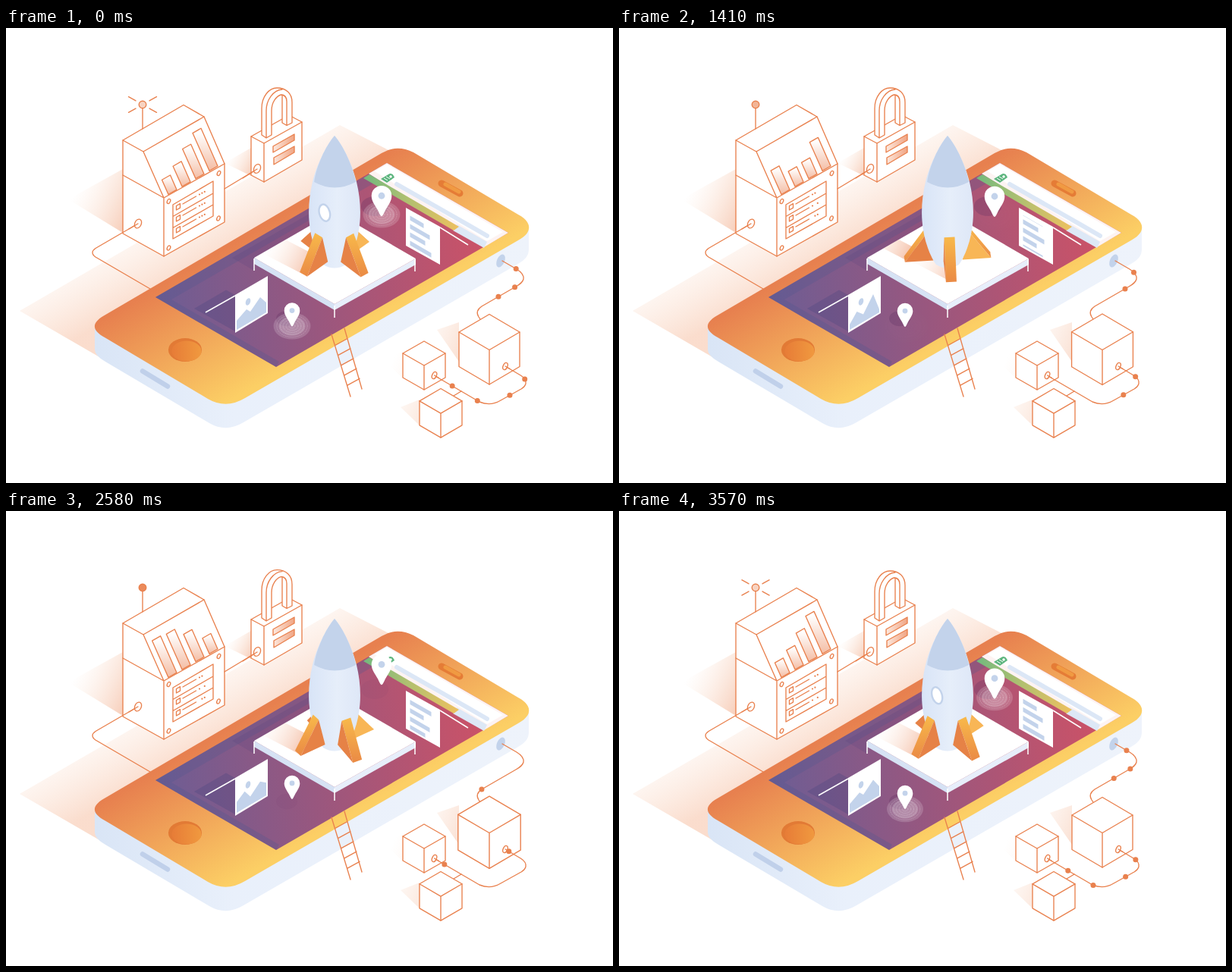
Recreate the animation shown at these times as an HTML page. Size 800x600 px, loop 3600 ms.

```html
<!DOCTYPE html>
<html lang="en">
<head>
<meta charset="utf-8">
<title>Launch</title>
<style>
html, body { margin: 0; width: 100%; height: 100%; overflow: hidden; background: #fff; }
svg { display: block; width: 800px; height: 600px; }
.line { fill: none; stroke: #e9814e; stroke-width: 1.35; stroke-linejoin: round; stroke-linecap: round; }
.box { fill: #fff; }
.dot { fill: #e9814e; }
.blue { fill: #c3d3eb; }
.white { fill: none; stroke: #fff; stroke-width: 1.5; }
</style>
</head>
<body>
<svg viewBox="0 0 800 600">
  <defs>
    <linearGradient id="top" gradientUnits="userSpaceOnUse" x1="198" y1="343" x2="287" y2="497"><stop stop-color="#e7804f"/><stop offset="1" stop-color="#fccf65"/></linearGradient>
    <linearGradient id="side"><stop stop-color="#d9e5f6"/><stop offset=".32" stop-color="#e9f0fb"/><stop offset="1" stop-color="#eef3fb"/></linearGradient>
    <linearGradient id="screen" gradientUnits="userSpaceOnUse" x1="200" y1="355" x2="630" y2="280"><stop stop-color="#6d5d94"/><stop offset=".45" stop-color="#98577f"/><stop offset="1" stop-color="#cb5267"/></linearGradient>
    <linearGradient id="load"><stop stop-color="#72b97e"/><stop offset=".5" stop-color="#b5c06f"/><stop offset="1" stop-color="#eec05f"/></linearGradient>
    <linearGradient id="phoneShade" gradientUnits="userSpaceOnUse" x1="300" y1="290" x2="240" y2="186"><stop stop-color="#f3a57c" stop-opacity=".38"/><stop offset="1" stop-color="#f9d3ba" stop-opacity="0"/></linearGradient>
    <linearGradient id="shade" x1="1" y1=".9" x2=".1" y2=".4"><stop stop-color="#f0a27c" stop-opacity=".5"/><stop offset="1" stop-color="#f9d3ba" stop-opacity="0"/></linearGradient>
    <linearGradient id="finShade" gradientUnits="userSpaceOnUse" x1="0" y1="0" x2="-52" y2="-28"><stop stop-color="#f0a583" stop-opacity=".6"/><stop offset="1" stop-color="#fbe0d0" stop-opacity="0"/></linearGradient>
    <linearGradient id="bar" x2="0" y2="1"><stop offset=".1" stop-color="#fff"/><stop offset="1" stop-color="#f4bda4"/></linearGradient>
    <linearGradient id="slot"><stop stop-color="#fde9df"/><stop offset="1" stop-color="#f0a584"/></linearGradient>
    <linearGradient id="body"><stop stop-color="#d8e4f7"/><stop offset=".55" stop-color="#e6eefa"/><stop offset="1" stop-color="#dee7f7"/></linearGradient>
    <linearGradient id="edge" x2="0" y2="1"><stop stop-color="#f8b94a"/><stop offset="1" stop-color="#ea8a45"/></linearGradient>
    <linearGradient id="home"><stop stop-color="#e77c37"/><stop offset="1" stop-color="#f0993f"/></linearGradient>
    <clipPath id="deck"><path d="M327 303L433 242 540 304 433 364Z"/></clipPath>
    <clipPath id="page"><path d="M532 246.500L568 267.300V307.800L532 287Z"/></clipPath>
  </defs>

  <path fill="url(#phoneShade)" d="M18 373L125 435 118 390 508 163 440 128Z"/>
  <path fill="url(#shade)" d="M82 226L154 270V186Z"/>
  <path fill="url(#shade)" d="M288 178L323 195V158Z"/>
  <path fill="url(#shade)" d="M498 438L523 462V426ZM520 500L545 524V490ZM568 398L597 440V388Z"/>

  <!-- server -->
  <path class="line box" d="M154 148L234 101.500 261 117 288 179V256L208 301 154 271Z"/>
  <path class="line" d="M154 148L181 163 261 117M181 163L208 224 288 179M208 224V301M154 194L208 224M180 106V133"/>
  <g id="bars"></g>
  <path class="line" d="M220 233L273 202V248L220 278ZM220 248.500L273 218M220 263.500L273 233"/>
  <g id="rows"></g>
  <circle class="box" cx="180" cy="101" r="4.800"/>
  <circle class="line" id="ball" cx="180" cy="101" r="4.800" style="fill:#e9814e"/>
  <path class="line" id="rays"/>
  <path class="line" d="M174 258L118 290.500Q110 296 118 302L190 344M288 212L331 186"/>

  <!-- padlock -->
  <path class="line box" d="M323 143L373 115 390 124V174L340 203 323 194Z"/>
  <path class="line" d="M323 143L340 152 390 124M340 152V203"/>
  <path class="line" style="fill:url(#slot)" d="M352 156L380 140V148L352 164ZM353 171L380 156V164L353 180Z"/>
  <path class="line box" id="shackle"/>
  <path class="line" d="M331 186L312 198"/>
  <g id="rings"></g>

  <!-- phone -->
  <path fill="url(#side)" d="M117 393V424Q117 432 131 440L268 521Q290 534 313 520L675 311Q689 303 689 293V263Z"/>
  <path fill="url(#top)" d="M133 377L495 165Q515 153 537 164L675 246C694 256 694 270 675 280L315 488Q290 503 266 489L130 408C112 398 112 388 133 377Z"/>
  <ellipse cx="236" cy="424.500" rx="22" ry="15.500" fill="#e27a35"/>
  <ellipse cx="238" cy="426" rx="19.500" ry="13.500" fill="url(#home)"/>
  <path d="M574 205L598 218" stroke="#e57c36" stroke-width="9" stroke-linecap="round"/>
  <path d="M579 206L597 216" stroke="#f09a42" stroke-width="5" stroke-linecap="round"/>
  <path d="M180 452.500L213 472.500" stroke="#c0d0ea" stroke-width="6.500" stroke-linecap="round"/>
  <ellipse class="blue" cx="652" cy="307" rx="5" ry="9" transform="rotate(24 652 307)"/>

  <!-- screen -->
  <path fill="url(#screen)" d="M197 355L356 447 662 270 502 178Z"/>
  <path fill="#50588c" opacity=".28" d="M197 355L472 196 486 204 218 358 360 440 356 447Z"/>
  <path fill="#503c78" opacity=".18" d="M298 303L405 242H433L327 303V320Z"/>
  <path fill="#46447f" opacity=".3" d="M248 370L290 345.500 302 352V400Z"/>
  <path fill="#fdf3f2" d="M478 192L502 178 662 270 630 289Z"/>
  <path fill="#fff" d="M486 189L502 180 655 269 634 281Z"/>
  <path fill="#dde8f6" d="M594 259L634 282 630 290 589 267Z"/>
  <path fill="url(#load)" d="M479 193L597 262 590 267 471 198Z"/>
  <path d="M515 206L594 251M594 251L634 274" stroke="#dce7f6" stroke-width="6" stroke-linecap="round"/>
  <path fill="#5cb57e" d="M494 199L504 193Q508 190 511 195L512 197 502 204Z"/>
  <path stroke="#fff" d="M498 198L503 201M501 196L506 199"/>
  <circle cx="507" cy="196" r="1.700" fill="#fff"/>

  <path class="white" d="M263 375L302 353M572 263L609 286"/>
  <path class="box" d="M302 352L345 327V376L302 402Z"/>
  <path class="blue" id="hills"/>
  <ellipse class="blue" cx="319" cy="361" rx="3" ry="5" transform="rotate(20 319 361)"/>
  <path class="box" d="M527 237L572 262V312L527 287Z"/>
  <g clip-path="url(#page)"><path class="blue" id="list"/></g>
  <g id="pins"></g>

  <!-- launch pad -->
  <path fill="#d6e2f4" d="M327 303L433 364V372L327 311Z"/>
  <path fill="#e7eefa" d="M540 304L433 364V372L540 312Z"/>
  <path class="box" d="M327 303L433 242 540 304 433 364Z"/>
  <path class="white" d="M327 304V320M433 366V382M539 305V321"/>
  <g id="finShades" clip-path="url(#deck)"></g>
  <g id="backFins"></g>
  <path fill="url(#body)" d="M433 142C445 156 457 182 462 203C469 232 469 262 459 290C456 299 451 308 448 312Q433 321 418 312C415 308 410 299 407 290C397 262 397 232 404 203C409 182 421 156 433 142Z"/>
  <path class="blue" d="M433 142C445 156 457 182 461 203Q433 218 406 203C409 182 421 156 433 142Z"/>
  <ellipse id="window" fill="#fff" stroke="#c3d3eb" stroke-width="2.400"/>
  <g id="frontFins"></g>

  <!-- ladder -->
  <path class="line" id="ladder"/>

  <!-- cables and cubes -->
  <path class="line" id="cableA" d="M654 307L673 318Q683 324 682 331Q681 336 672 341L627 367Q618 373 623 381L625 384"/>
  <path class="line" d="M600 479L590 485"/>
  <g id="cubes"></g>
  <path class="line" id="cableB" d="M658 446L679 458.500Q686 463 685 469Q684 473 679 476L652 491Q639 499 624 493L564 458"/>
  <g id="plugs"></g>
  <g id="beads"></g>
</svg>
<script>
const LOOP = 3600, STEP = 30, HALF = LOOP / 2, TAU = Math.PI * 2;
const $ = id => document.getElementById(id);
const mod = (a, n) => ((a % n) + n) % n;
const clamp = v => Math.max(0, Math.min(1, v));
const smooth = p => (1 - Math.cos(Math.PI * clamp(p))) / 2;

function add(parent, tag, attrs) {
  const el = document.createElementNS('http://www.w3.org/2000/svg', tag);
  set(el, attrs);
  return parent.appendChild(el);
}
function set(el, attrs) {
  for (const k in attrs) el.setAttribute(k, attrs[k]);
}
const poly = pts => 'M' + pts.map(p => p.map(v => v.toFixed(2)).join(' ')).join('L') + 'Z';

// Eased value from [time, value] pairs
function track(keys, t) {
  for (let i = 1; i < keys.length; i++) {
    const [t0, a] = keys[i - 1], [t1, b] = keys[i];
    if (t <= t1) return a + (b - a) * smooth((t - t0) / (t1 - t0));
  }
  return keys[keys.length - 1][1];
}

function ring(parent, cx, cy, rx, ry) {
  add(parent, 'ellipse', { class: 'line box', cx, cy, rx, ry, transform: `rotate(24 ${cx} ${cy})` });
}

// Server front
const bars = [900, 600, 360, 0].map((peak, i) => ({
  peak, x: 214 + 18 * i, y: 219.5 - 10.4 * i,
  el: add($('bars'), 'path', { class: 'line', style: 'fill:url(#bar)' })
}));
const lamps = [0, 1, 2].map(r => {
  const y = 236 + 15 * r;
  add($('rows'), 'path', {
    class: 'line',
    d: `M224.5 ${y - 1.5}l5 -2.900v5.500l-5 2.900ZM233 ${y - 4}l17.500 -10`
  });
  return [0, 1, 2].map(k => add($('rows'), 'circle', { class: 'dot', cx: 255 + 3.4 * k, cy: y - 16.5 - 1.8 * k, r: 1.1 }));
});
const LAMP_STEPS = ['777', '635', '356', '421', '356', '635'];
[[214.5, 228.5], [280.5, 191.5], [280, 251], [214.5, 290]].forEach(([x, y]) => ring($('rings'), x, y, 2, 3.2));
ring($('rings'), 174, 258, 4.2, 6.2);
ring($('rings'), 331, 185.5, 4.2, 6.2);
add($('rings'), 'path', { class: 'line', d: 'M174 258l-12 7M331 186l-10 6' });

let rungs = 'M429 404L454 486M446 396L469 476';
for (let i = 0; i < 5; i++) rungs += `M${433.5 + 4 * i} ${418.5 + 13.2 * i}l16.500 -9`;
set($('ladder'), { d: rungs });

// Cubes
function cube(cx, y, w, h, H) {
  const el = add($('cubes'), 'g', {}), m = y + 2 * h;
  add(el, 'path', { class: 'line box', d: `M${cx - w} ${y + h}L${cx} ${y}L${cx + w} ${y + h}v${H}L${cx} ${m + H}L${cx - w} ${y + h + H}Z` });
  add(el, 'path', { class: 'line', d: `M${cx - w} ${y + h}L${cx} ${m}L${cx + w} ${y + h}M${cx} ${m}v${H}` });
  return k => set(el, { transform: `translate(${cx} ${m}) scale(${k}) translate(${-cx} ${-m})` });
}
const bigCube = cube(637, 377.5, 40, 23.5, 45.5);
cube(551, 413, 28, 16, 32);
const lowCube = cube(573, 475.5, 28, 16.3, 32);
ring($('plugs'), 658, 446, 2.8, 4.8);
ring($('plugs'), 564.5, 458, 2.8, 4.8);
add($('plugs'), 'path', { class: 'line', d: 'M658 446l6 3.500M564.500 458l6 3.500' });

// Beads leave at the listed times and run at constant speed
const cables = [
  { path: $('cableA'), speed: 0.126, starts: [941, 1181, 1498, 1744, 2966, 3164, 3433] },
  { path: $('cableB'), speed: 0.14, starts: [960, 1221, 1435, 2540, 2814, 3143, 3379] }
];
for (const c of cables) {
  c.length = c.path.getTotalLength();
  c.beads = c.starts.map(() => add($('beads'), 'circle', { class: 'dot', r: 3.5 }));
}
function pulse(times, t) {
  let sum = 0;
  for (const at of times) {
    const d = Math.abs(mod(t - at + HALF, LOOP) - HALF);
    if (d < 110) sum += smooth(1 - d / 110);
  }
  return 1 + 0.03 * Math.min(1, sum);
}

// Map pins with ripples
const pins = [[495, 249, 1, 246], [377, 394, 0.775, 393]].map(([x, y, k, ry]) => {
  const g = $('pins');
  const shadow = add(g, 'ellipse', { cx: x - 9 * k, cy: y - 14 * k, rx: 18 * k, ry: 13 * k, fill: '#5a2c60' });
  const ripple = add(g, 'g', {});
  [1, 0.72].forEach(s => add(ripple, 'ellipse', { rx: 25 * s, ry: 18 * s, fill: '#fff', opacity: 0.17 }));
  [0.16, 0.32, 0.48, 0.64, 0.82].forEach(s => add(ripple, 'ellipse', {
    rx: 25 * s, ry: 18 * s, fill: 'none', stroke: '#fff', 'stroke-width': 0.8, 'stroke-dasharray': '1 1', opacity: 0.4
  }));
  const el = add(g, 'g', {});
  add(el, 'path', { class: 'box', d: 'M0 0C-1.500 0-3-4-5-8C-9-15-13.300-20-13.300-27A13.300 13.300 0 0 1 13.300-27C13.300-20 9-15 5-8C3-4 1.500 0 0 0Z' });
  add(el, 'circle', { class: 'blue', cy: -27, r: 4.4 });
  return { x, y, k, ry, shadow, ripple, el };
});

// Rocket fins
const fins = [0, 90, 180, 270].map(turn => {
  const el = add($('backFins'), 'g', {});
  return {
    turn, el,
    edge: add(el, 'path', { fill: 'url(#edge)' }),
    face: add(el, 'path', {}),
    shade: add($('finShades'), 'path', { fill: 'url(#finShade)' })
  };
});

function drawFin(fin, angle) {
  const a = mod(angle + fin.turn + 180, 360) - 180, r = a * Math.PI / 180;
  const s = Math.sin(r), c = Math.cos(r);
  const root = [433 + 29 * s, 267 + 9 * c];
  const tip = [433 + 57 * s, 302 + 33 * c];
  const heel = [433 + 19 * s, 302 + 5 * c];
  const shift = ([x, y], side) => [x + side * 7 * c, y - side * 4 * s];
  const side = a < 0 ? 1 : -1;
  set(fin.edge, { d: poly([shift(root, -1), shift(root, 1), shift(tip, 1), shift(tip, -1)]) });
  const mix = clamp((a - 60) / 35);
  set(fin.face, {
    d: poly([shift(root, side), shift(tip, side), shift(heel, side)]),
    fill: `rgb(${230 + 18 * mix},${130 + 52 * mix},${70 + 16 * mix})`
  });
  const layer = $(c > 0.25 ? 'frontFins' : 'backFins');
  if (fin.el.parentNode !== layer) layer.appendChild(fin.el);
  const dx = heel[0] - tip[0], dy = heel[1] - tip[1];
  set(fin.shade, {
    d: poly([[0, 0], [dx, dy], [dx - 56, dy - 29], [-56, -29]]),
    transform: `translate(${tip[0]} ${tip[1]})`,
    opacity: c > 0 ? clamp((30 - a) / 18) : 0
  });
}

function drawRocket(t) {
  const a = -46 + t / 10, r = a * Math.PI / 180, c = Math.cos(r);
  const x = 433.5 + 19 * Math.sin(r), y = 236 + 11 * c;
  const tilt = mod(a + 180, 360) - 180;
  set($('window'), {
    cx: x, cy: y, rx: Math.max(0, 10 * c), ry: 11.3,
    transform: `rotate(${tilt * 0.33} ${x} ${y})`, visibility: c > 0.02 ? 'visible' : 'hidden'
  });
  fins.forEach(f => drawFin(f, a));
}

function drawServer(t) {
  for (const b of bars) {
    const h = 0.565 + 0.25 * Math.cos(TAU * (t - b.peak) / HALF);
    const x = b.x - 27 * h, y = b.y - 61 * h;
    set(b.el, { d: poly([[b.x, b.y], [x, y], [x + 11, y - 6.3], [b.x + 11, b.y - 6.3]]) });
  }
  const masks = LAMP_STEPS[Math.floor(t / 300)];
  lamps.forEach((row, r) => row.forEach((el, k) => set(el, { opacity: masks[r] >> k & 1 })));
  set($('ball'), { 'fill-opacity': 0.65 - 0.3 * Math.cos(TAU * t / HALF) });

  const u = t > 900 ? t - HALF : t;
  const out = 7 + 11.5 * clamp((u + 300) / 280), inn = 9 + 9.5 * clamp(u / 330);
  let d = '';
  if (out > inn) for (const sx of [-1, 1]) for (const sy of [-1, 1])
    d += `M${180 + sx * inn} ${101 + sy * inn * 0.56}L${180 + sx * out} ${101 + sy * out * 0.56}`;
  set($('rays'), { d });
}

const LIFT = [[0, 0], [360, 0], [590, -16.5], [920, 8], [1210, -7], [1400, 0], [HALF, 0]];
function drawLock(t) {
  const v = track(LIFT, t), y = n => n + v;
  set($('shackle'), {
    d: `M337 141V${y(106)}C337 ${y(90)} 347 ${y(79)} 357 ${y(79)}C369 ${y(79)} 377 ${y(86)} 377 ${y(98)}V125L370 128.500V${y(97)}` +
       `C370 ${y(91)} 367 ${y(88)} 362.500 ${y(88)}C356 ${y(90)} 350 ${y(98)} 350 ${y(109)}V141L343 145Z` +
       `M343 145V${y(109)}C343 ${y(95)} 352 ${y(82)} 364 ${y(81)}C352 ${y(82)} 343 ${y(95)} 343 ${y(109)}Z` +
       `M364 ${y(88)}V125L370 128.500V${y(97)}Q370 ${y(90)} 364 ${y(88)}Z`
  });
}

const LENGTHS = [18, 26, 20, 28];
function drawCards(t) {
  const scroll = 44 * t / LOOP;
  let d = '';
  for (let i = 0; i < 9; i++) {
    const w = LENGTHS[i % 4];
    d += `M532.5 ${247.5 + 11 * i - scroll}l${w} ${w * 0.577}v6l${-w} ${-w * 0.577}Z`;
  }
  set($('list'), { d });
  const w = TAU * t / LOOP, s = Math.sin(w * 2), c = Math.cos(w);
  set($('hills'), {
    d: poly([[304, 398], [304, 386 - 5 * s], [315 + 2 * c, 371 - 3 * s], [322, 376 - 2 * c],
      [335, 355 + 4 * s], [343, 362 - 9 * s], [343, 375]])
  });
}

function drawPins(t) {
  const u = t < 45 ? t + LOOP : t;
  const hop = u < 1830 ? 0 : u < 2560 ? -20 * smooth((u - 1830) / 730) : -20 * (1 - clamp((u - 2560) / 1080));
  const age = mod(t - 2900, LOOP);
  const size = 31 / 25 * (1 - Math.exp(-age / 450));
  for (const p of pins) {
    set(p.el, { transform: `translate(${p.x} ${p.y + hop * (p.k < 1 ? 0.72 : 1)}) scale(${p.k})` });
    set(p.shadow, { opacity: 0.27 * (1 + hop / 24) });
    set(p.ripple, { transform: `translate(${p.x} ${p.ry}) scale(${size})`, opacity: clamp((2150 - age) / 1450) });
  }
}

function drawCables(t) {
  for (const c of cables) c.beads.forEach((el, i) => {
    const s = mod(t - c.starts[i], LOOP) * c.speed, on = s <= c.length;
    set(el, { visibility: on ? 'visible' : 'hidden' });
    if (on) {
      const p = c.path.getPointAtLength(s);
      set(el, { cx: p.x, cy: p.y });
    }
  });
  const b = cables[1];
  bigCube(pulse(b.starts.map(s => s + 40), t));
  lowCube(pulse(b.starts.map(s => s + b.length / b.speed), t));
}

function draw(ms) {
  const t = Math.floor(mod(ms, LOOP) / STEP) * STEP, half = t % HALF;
  drawServer(half);
  drawLock(half);
  drawCards(t);
  drawPins(t);
  drawRocket(t);
  drawCables(t);
}

const begin = performance.now();
function tick() {
  draw(performance.now() - begin);
  requestAnimationFrame(tick);
}
tick();
</script>
</body>
</html>
```
